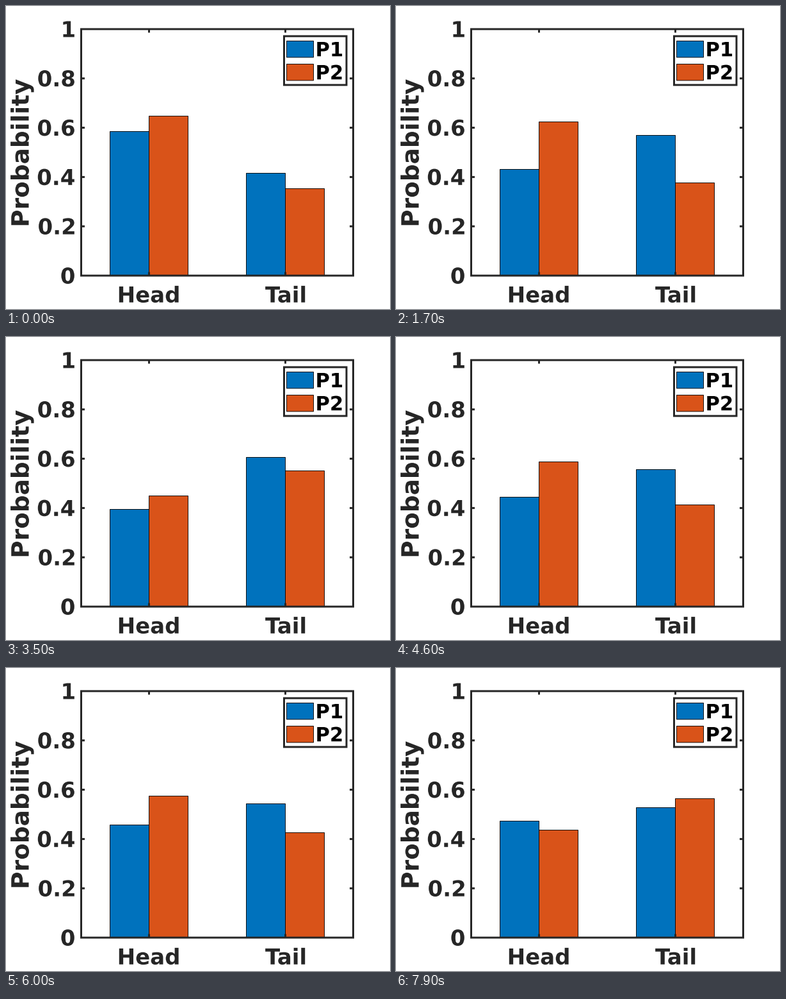
A matplotlib script that plays this animation: 600 px wide and 472 px high, repeating every 8 s.

```python
import numpy as np
import matplotlib.pyplot as plt
from matplotlib.animation import FuncAnimation
from matplotlib.patches import PathPatch, Rectangle
from matplotlib.textpath import TextPath
from matplotlib.transforms import Affine2D

W, H, DPI = 600, 472, 100
PX = 72 / DPI
FRAMES, INTERVAL = 80, 100
BLUE, ORANGE, INK = "#0072BD", "#D95319", "#262626"
LEFT, RIGHT, TOP, BOTTOM = 117.5, 542.5, 36, 420
CENTERS = (223.5, 436.5)
BAR = 61

fig = plt.figure(figsize=(W / DPI, H / DPI), dpi=DPI, facecolor="white")
ax = fig.add_axes([0, 0, 1, 1])
ax.set_xlim(0, W)
ax.set_ylim(H, 0)
ax.axis("off")


def level(p):
    return BOTTOM - p * (BOTTOM - TOP)


def box(x, y, w, h, face, edge="black", lw=0.9, z=1):
    return ax.add_patch(Rectangle((x, y), w, h, fc=face, ec=edge, lw=lw * PX,
                                  joinstyle="miter", snap=False, zorder=z))


def line(x0, y0, x1, y1):
    ax.plot([x0, x1], [y0, y1], color=INK, lw=3 * PX, snap=False,
            solid_capstyle="butt", zorder=3)


def label(s, x, y, size, align=0.5, color=INK, angle=0):
    """Place text by its inked extent: align 0 left, 0.5 centre, 1 right."""
    path = TextPath((0, 0), s, size=size,
                    prop={"family": "DejaVu Sans", "weight": "bold"})
    ext = path.get_extents()
    place = (Affine2D().translate(-(ext.x0 + align * ext.width), 0)
             .scale(1, -1).rotate_deg(angle).translate(x, y))
    ax.add_patch(PathPatch(place.transform_path(path), fc=color, lw=0, zorder=5))


# Axes frame, ticks and labels
box(LEFT, TOP, RIGHT - LEFT, BOTTOM - TOP, "none", INK, 3, z=3)
for v in ("0", "0.2", "0.4", "0.6", "0.8", "1"):
    y = level(float(v))
    label(v, 106.8, y + 12.4, 34, align=1)
    if 0 < float(v) < 1:
        line(LEFT, y, LEFT + 5.5, y)
        line(RIGHT, y, RIGHT - 5.5, y)
for x, name in zip(CENTERS, ("Head", "Tail")):
    line(x, TOP, x, TOP + 5.5)
    line(x, BOTTOM, x, BOTTOM - 5.5)
    label(name, x - 0.3, 461.7, 34)
label("Probability", 35.5, 227.8, 37.4, angle=-90)

# Legend
box(434.5, 47, 97.5, 76, "white", INK, 3, z=4)
for y, name, color in ((54.5, "P1", BLUE), (90.5, "P2", ORANGE)):
    box(438.5, y, 42, 25.5, color, z=5)
    label(name, 486.3, y + 23.8, 30.6, align=0, color="black")

# Both players' head probabilities circle inwards around 1/2
TIMES = np.array([0, 10, 24, 35, 46, 60, 79])
HEADS = np.array([[.5846, .6484], [.5872, .3763], [.5508, .3763],
                  [.3938, .4480], [.4440, .5870], [.4577, .5736],
                  [.4720, .4370]])
STEP = 25  # degrees per tick, roughly

dev = 2 * HEADS - 1
round_xy = np.sign(dev) * np.sqrt(-np.log(1 - dev ** 2))
log_r = np.log(np.hypot(*round_xy.T))
phase = np.degrees(np.arctan2(round_xy[:, 1], round_xy[:, 0]))
phase += 360 * np.round((60 + STEP * TIMES - phase) / 360)


def heads(t):
    r = np.exp(np.interp(t, TIMES, log_r))
    a = np.radians(np.interp(t, TIMES, phase))
    xy = r * np.array([np.cos(a), np.sin(a)])
    return 0.5 + 0.5 * np.sign(xy) * np.sqrt(1 - np.exp(-xy ** 2))


bars = [[box(x - BAR, BOTTOM, BAR, 0, BLUE), box(x, BOTTOM, BAR, 0, ORANGE)]
        for x in CENTERS]


def update(i):
    p = heads(i)
    for pair, probs in zip(bars, (p, 1 - p)):
        for bar, value in zip(pair, probs):
            top = np.floor(level(value)) + 0.5
            bar.set_y(top)
            bar.set_height(BOTTOM - top)
    return [bar for pair in bars for bar in pair]


anim = FuncAnimation(fig, update, frames=FRAMES, interval=INTERVAL,
                     repeat=True, repeat_delay=0, blit=False)
plt.show()
```
